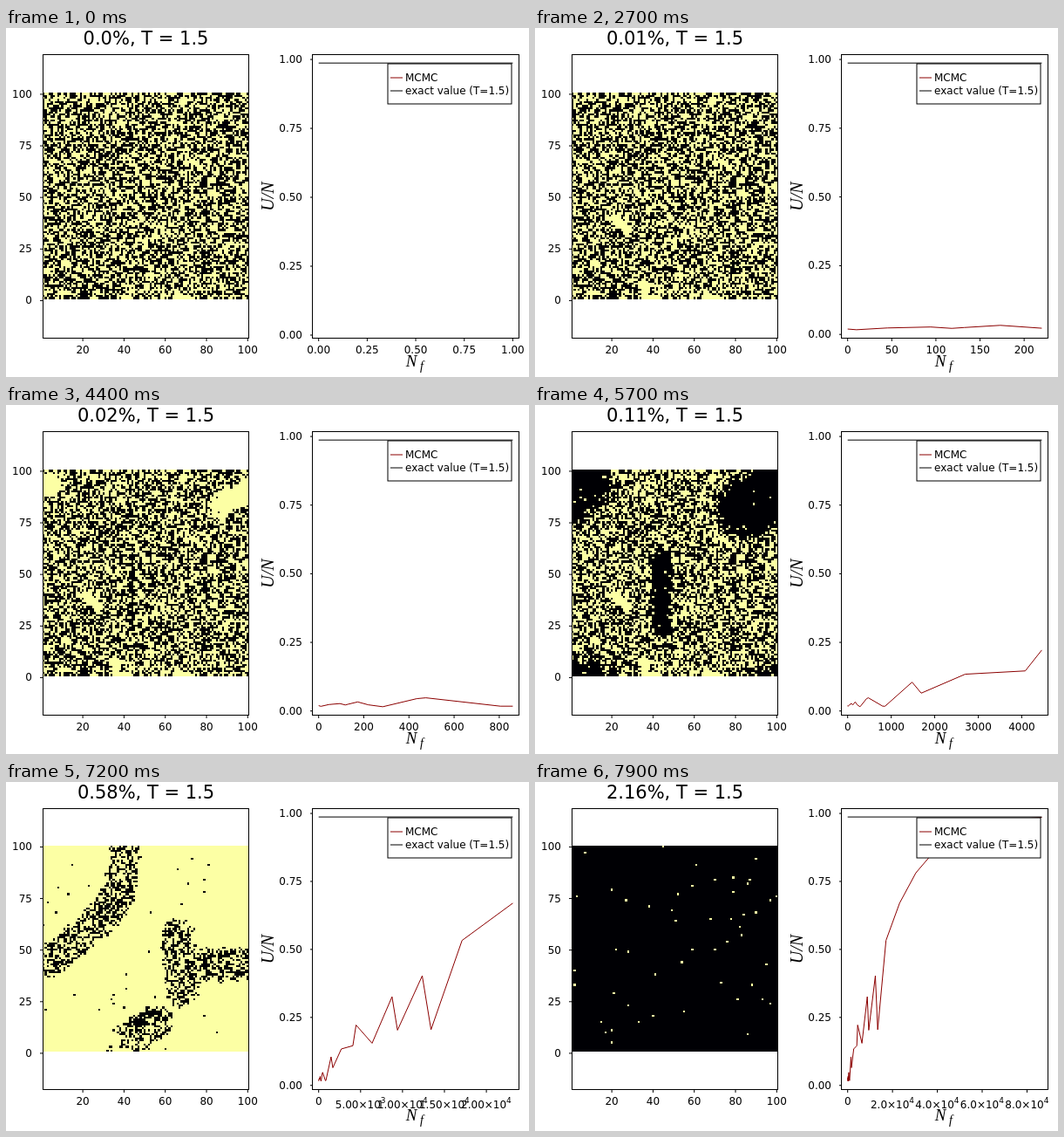
An HTML page with a canvas that plays this animation: 600x400 px, repeating every 8 s.

```html
<!DOCTYPE html>
<html>
<head>
<meta charset="utf-8">
<style>
html, body { margin: 0; width: 600px; height: 400px; overflow: hidden; background: #fff; }
canvas { display: block; }
</style>
</head>
<body>
<canvas id="stage" width="600" height="400"></canvas>
<script>
const ctx = document.getElementById('stage').getContext('2d');
const FRAMES = 80, STEP_MS = 100, SIZE = 100, CELL = 2.365, EXACT = 0.987;
const LIGHT = 0, DARK = 1, COLORS = ['#fcffa4', '#000004'], RED = '#8b0000';
const SANS = '"DejaVu Sans", sans-serif', SERIF = '"Liberation Serif", serif';

// Places where clusters grow: a path of lattice points and the colour of the next flip
const spot = { path: [[36, 2], [36, 8]], next: LIGHT };
const patch = { path: [[21, 40], [28, 34]], next: LIGHT };
const column = { path: [[44, 58], [44, 24]], next: DARK };
const corner = { path: [[86, 82], [104, 94]], next: DARK };
// The last disordered band; everything outside it flips
const band = {
  path: [[66, 58], [68, 30], [70, 43], [92, 43], [105, 45], [126, 62], [138, 77], [140, 100], [143, 107], [156, 115]],
  next: DARK, outside: true
};

// Turning points of the energy curve: step, flipped spins, U/N, cluster
const curve = [
  [0, 0, .0195], [2, 10, .017], [5, 45, .0235, spot], [13, 94, .027], [16, 118, .022],
  [18, 132, .025], [21, 173, .033, patch], [24, 220, .0225], [29, 284, .0155, column],
  [32, 435, .045, corner], [36, 475, .048], [39, 805, .0175, corner], [44, 860, .0175],
  [45, 1480, .105, corner], [49, 1690, .065, column], [52, 2700, .134, corner],
  [55, 4080, .146, corner], [57, 4460, .222, column], [59, 6370, .155, corner],
  [61, 8750, .326, corner], [63, 9400, .203, column], [66, 12350, .403, corner],
  [68, 13400, .205, column], [70, 17100, .533, band], [72, 23150, .67, band]
];
// Then nearly the whole lattice flips at each step and the energy settles
for (let s = 1; s <= 7; s++) {
  const flipped = curve[curve.length - 1][1] + 10000 - 2700 * .6 ** (s - 1);
  curve.push([72 + s, flipped, .99 - .32 * Math.exp(-.4 * s - .03 * s * s), band]);
}

let seed = 20;
function random() {
  seed = seed + 0x6D2B79F5 | 0;
  let t = Math.imul(seed ^ seed >>> 15, seed | 1);
  t ^= t + Math.imul(t ^ t >>> 7, t | 61);
  return ((t ^ t >>> 14) >>> 0) / 4294967296;
}

const clamp = (v, lo, hi) => Math.max(lo, Math.min(hi, v));
const wrap = d => d - SIZE * Math.round(d / SIZE);
const segments = path => path.slice(1).map(([x, y], i) => [...path[i], x, y]);

// Distance to a path on the periodic lattice
function distance(x, y, path) {
  return Math.min(...segments(path).map(([ax, ay, bx, by]) => {
    const hx = (bx - ax) / 2, hy = (by - ay) / 2;
    const dx = wrap(x - ax - hx), dy = wrap(y - ay - hy);
    const t = clamp((dx * hx + dy * hy) / (hx * hx + hy * hy), -1, 1);
    return Math.hypot(dx - t * hx, dy - t * hy);
  }));
}

// Half width that gives a band around the path the wanted area
function halfWidth(path, area) {
  const length = segments(path).reduce((sum, [ax, ay, bx, by]) => sum + Math.hypot(bx - ax, by - ay), 0);
  return (Math.sqrt(length * length + Math.PI * Math.max(0, area)) - length) / Math.PI;
}

function flipCluster(grid, cluster, size) {
  const { path, next, outside } = cluster;
  const width = halfWidth(path, outside ? (9700 - size) * .75 : size);
  const skip = outside ? .0055 : .015;
  for (let i = 0; i < grid.length; i++) {
    const d = distance(i % SIZE + 1, Math.floor(i / SIZE) + 1, path);
    const edge = width * (.8 + random() * .4);
    if ((outside ? d >= edge : d < edge) && random() > skip) grid[i] = next;
  }
  cluster.next = 1 - next;
}

const grids = [Array.from({ length: SIZE * SIZE }, () => random() < .48 ? DARK : LIGHT)];
for (let k = 1; k < FRAMES; k++) {
  const grid = grids[k - 1].slice();
  const i = curve.findIndex(p => p[0] === k);
  if (i > 0 && curve[i][3]) flipCluster(grid, curve[i][3], curve[i][1] - curve[i - 1][1]);
  else grid[Math.floor(random() * grid.length)] ^= 1;
  grids.push(grid);
}

function line(points, color = '#000') {
  ctx.strokeStyle = color;
  ctx.beginPath();
  points.forEach(([x, y]) => ctx.lineTo(x, y));
  ctx.stroke();
}

function text(str, x, y, align = 'center', font = '12px ' + SANS) {
  ctx.font = font;
  ctx.textAlign = align;
  ctx.fillStyle = '#000';
  ctx.fillText(str, x, y);
}

function box(x, y, w, h) {
  ctx.strokeStyle = '#000';
  ctx.strokeRect(x, y, w, h);
}

function xTick(x, bottom) {
  line([[x, bottom], [x, bottom + 4]]);
}

function yTick(label, left, y) {
  line([[left - 3, y], [left, y]]);
  text(label, left - 12, y + 4, 'right');
}

// Nice tick distance: weighs tick count, coverage and roundness
function tickStep(max) {
  if (max <= 1) return .25;
  const limit = max * 1.03, base = 10 ** Math.floor(Math.log10(limit));
  let best = 0, bestScore = -1;
  for (const b of [base / 10, base])
    for (const [q, nice] of [[1, 1], [5, .9], [2, .7], [2.5, .4]]) {
      const n = Math.floor(limit / (q * b)) + 1;
      const score = (1 - Math.abs(n - 5) / 5) / 4 + (n - 1) * q * b / max / 3 + nice / 4;
      if (score > bestScore) [best, bestScore] = [q * b, score];
    }
  return best;
}

function scientific(value, digits, x, y) {
  const power = Math.floor(Math.log10(value) + 1e-9);
  const body = (value / 10 ** power).toFixed(digits) + '×10';
  ctx.font = '12px ' + SANS;
  const w = ctx.measureText(body).width, left = x - (w + 6) / 2;
  text(body, left, y, 'left');
  text(power, left + w, y - 6, 'left', '9px ' + SANS);
}

function drawLattice(k, percent, bottom) {
  const mid = (31 + bottom) / 2, top = mid - 118.7;
  const edgeX = i => Math.round(42 + i * CELL), edgeY = i => Math.round(top + i * CELL);
  grids[k].forEach((spin, i) => {
    const c = i % SIZE, r = SIZE - 1 - Math.floor(i / SIZE);
    ctx.fillStyle = COLORS[spin];
    ctx.fillRect(edgeX(c), edgeY(r), edgeX(c + 1) - edgeX(c), edgeY(r + 1) - edgeY(r));
  });
  box(42.5, 30.5, 236, bottom - 30);
  for (let v = 20; v <= 100; v += 20) {
    const x = 42 + (v - .5) * CELL;
    xTick(x, bottom);
    text(v, x, bottom + 18);
  }
  for (let v = 0; v <= 100; v += 25) yTick(v, 42, mid + (50.5 - v) * CELL);
  const shown = Math.round(percent * 100) / 100;
  text((shown % 1 ? shown : shown.toFixed(1)) + '%, T = 1.5', 160.5, 18.5, 'center', '21px ' + SANS);
}

function drawLegend() {
  ctx.fillStyle = '#fff';
  ctx.fillRect(438, 41, 142, 46);
  box(438, 41, 142, 46);
  line([[441, 57], [455, 57]], RED);
  line([[441, 72], [455, 72]]);
  text('MCMC', 458, 61, 'left');
  text('exact value (T=1.5)', 458, 76, 'left');
}

function drawChart(points, max, step, sci, bottom) {
  const us = points.map(p => p[2]), low = Math.min(...us), high = Math.max(EXACT, ...us);
  const pad = (bottom - 31) * .03 / 1.06;
  const px = n => 358.7 + n / max * 222.7;
  const py = u => 31 + pad + (high - u) / (high - low) * (bottom - 31 - 2 * pad);
  line(points.map(([, n, u]) => [px(n), py(u)]), RED);
  line([[px(0), py(EXACT)], [px(max), py(EXACT)]]);
  box(351.5, 30.5, 237, bottom - 30);

  const decimals = v => (String(v).split('.')[1] || '').length;
  for (let v = 0; v <= max * 1.03; v += step) {
    xTick(px(v), bottom);
    if (sci && v) scientific(v, 1 + decimals(step / 1e4), px(v), bottom + 22);
    else text(v.toFixed(sci ? 0 : decimals(step)), px(v), bottom + 18);
  }
  for (let v = 0; v <= 1; v += .25) yTick(v.toFixed(2), 352, py(v));

  text('N', 465, 388, 'center', 'italic 19px ' + SERIF);
  text('f', 477, 392, 'center', 'italic 14px ' + SERIF);
  ctx.save();
  ctx.translate(307, (31 + bottom) / 2);
  ctx.rotate(-Math.PI / 2);
  text('U/N', 0, 0, 'center', 'italic 20px ' + SERIF);
  ctx.restore();
  drawLegend();
}

function draw(k) {
  ctx.fillStyle = '#fff';
  ctx.fillRect(0, 0, 600, 400);
  ctx.lineWidth = 1;
  const points = curve.filter(p => p[0] <= k);
  const flipped = points[points.length - 1][1], max = Math.max(1, flipped), step = tickStep(max);
  const sci = Math.floor(max * 1.03 / step) * step >= 1e4;
  const bottom = sci ? 352 : 355;
  drawLattice(k, flipped / 40000, bottom);
  drawChart(points, max, step, sci, bottom);
}

let shown = -1;
function tick() {
  const k = Math.floor(performance.now() / STEP_MS) % FRAMES;
  if (k !== shown) draw(shown = k);
  requestAnimationFrame(tick);
}
tick();
</script>
</body>
</html>
```
